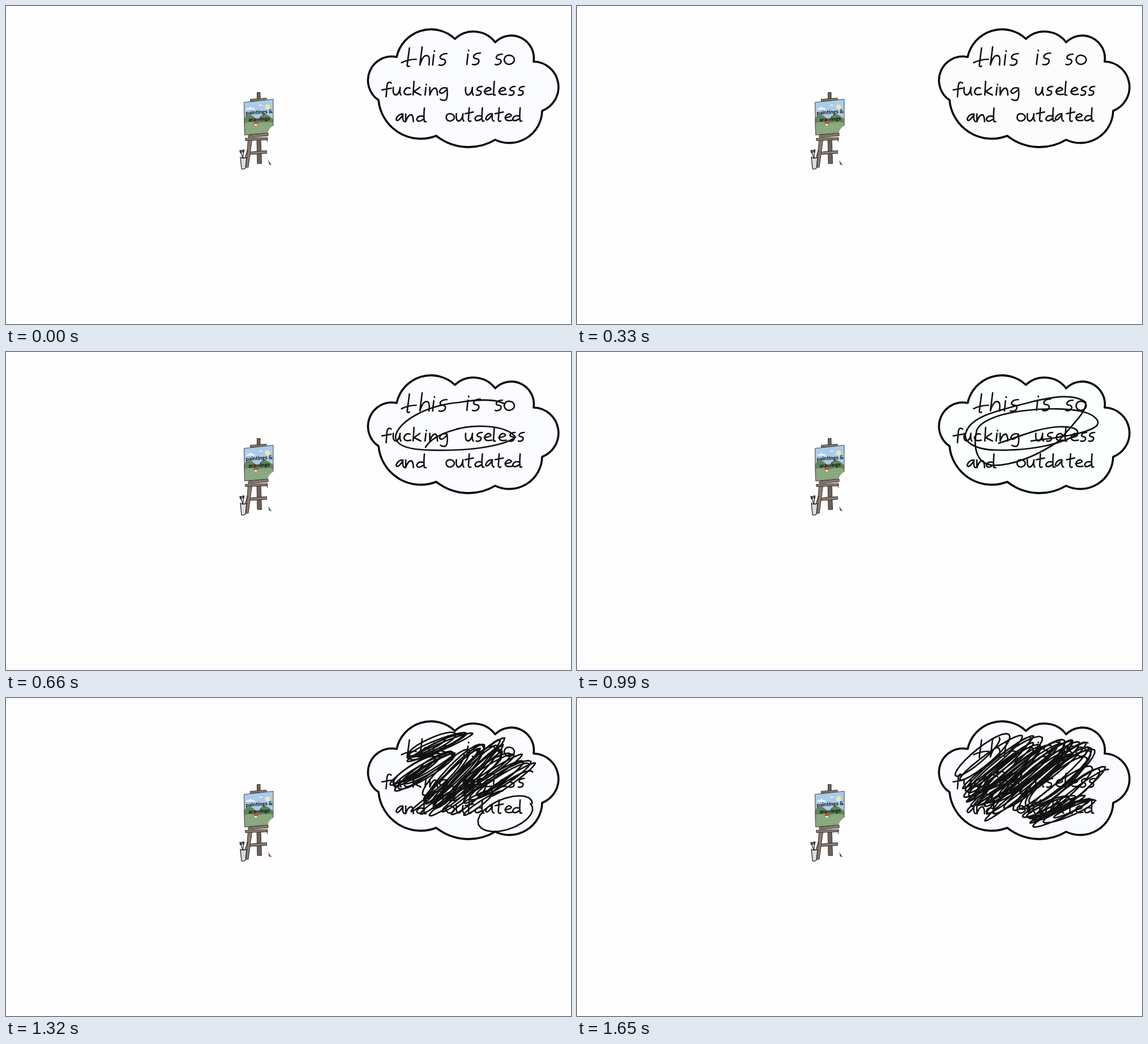
An HTML page for the animation above (1980 ms loop, 998 by 561 pixels).

```html
<!DOCTYPE html>
<html lang="en">
<head>
<meta charset="utf-8">
<title>Thought bubble</title>
<style>
  html, body { margin: 0; width: 100%; height: 100%; overflow: hidden; background: #fefefe; }
  svg { display: block; width: 100%; height: 100%; }
  .pen { fill: none; stroke: #111; stroke-linecap: round; stroke-linejoin: round; }
  .pen path { vector-effect: non-scaling-stroke; }
  .label { font: bold 9.5px Lato, "Open Sans", sans-serif; fill: #0b0b0b; }
</style>
</head>
<body>
<svg viewBox="0 0 998 561">
  <defs>
    <clipPath id="canvasEdge"><path d="M420 170L472 164V211Q464 216 462 224L421 228Z"/></clipPath>
  </defs>

  <g stroke="#3a322d" fill="#8a7a6e">
    <path fill="#6d6057" d="M443.5 152.5H449V164H443.5ZM443 235H450L451.5 278H444Z"/>
    <path d="M431.5 164.5L460 162.5V166L431.5 168Z"/>
    <path d="M430 257.5L460.5 255V260L429.5 262Z"/>
    <path d="M427.5 236H434.5L428 284.5H423.5Z"/>
    <path d="M428 228L463 224V229L428 232ZM422.5 233.5L462 232V236L423 237.5Z"/>
    <path fill="none" d="M460.5 234L462 240"/>
    <path fill="#3a322d" stroke="none" d="M463.5 271L465.5 276L469.5 281L464.5 279Z"/>
  </g>

  <g clip-path="url(#canvasEdge)">
    <path fill="#abcbea" d="M418 160H474V230H418Z"/>
    <path fill="#e9f2fb" d="M424 183Q425 179 429 180Q432 175 435 180Q439 179 440 183ZM446 176Q450 171 454 176Z"/>
    <circle cx="462" cy="178" r="4.5" fill="#f1e5ab"/>
    <path fill="#638459" d="M418 202Q425 189 433 192Q440 196 445 203Q451 188 459 191Q467 194 474 202V212H418Z"/>
    <path fill="#8aa87d" d="M418 208Q430 202 444 207Q459 203 474 206V230H418Z"/>
    <path fill="none" stroke="#b4cbaa" stroke-dasharray="1 4" d="M423 215L463 212M425 221L462 218"/>
    <path fill="#f7eee5" d="M439.5 207H443V211H439.5Z"/>
    <path fill="#e5392d" d="M437.5 208Q438 204 441.5 204Q445 204 445 208Z"/>
  </g>
  <path fill="none" stroke="#454840" d="M472 211V164.5L420.5 170L421.5 227.5L462 224"/>
  <g class="label">
    <text transform="translate(423.5 192) rotate(-4)">paintings &amp;</text>
    <text transform="translate(428.5 204) rotate(-4)">arawings</text>
  </g>
  <g stroke="#222" fill="none" stroke-width="1.3">
    <path d="M415 258L418 268M419 256V268M427 254L422 268"/>
    <path fill="#777" d="M413 255H416V258L414 259ZM418 254H420.5L420 258L418 257Z"/>
    <path fill="#d9dde0" d="M414 267Q419 270 425 267L423 286Q419 289 416 287Z"/>
  </g>

  <path id="cloud" stroke="#080808" stroke-width="3.6" stroke-linejoin="round" d="M690 90
    A62 62 0 0 1 793 58A48 48 0 0 1 864 64A40 40 0 0 1 932 98A45 45 0 0 1 947 185
    A58 58 0 0 1 864 236A92 92 0 0 1 760 229A75 75 0 0 1 658 166A42 42 0 0 1 690 90Z"/>
  <g id="words" class="pen" stroke-width="2.6"></g>
  <path id="scribble" class="pen" stroke-width="2.7"/>
</svg>

<script>
const STEP = 330;
const byId = id => document.getElementById(id);

// Pen strokes on a baseline at 0; the key's number is the letter's width
const glyphs = {
  T: { width: 11, d: 'M6-15L4 0Q4 2 6 1M-1-2Q5-5 12-5' },
  t: { width: 9, d: 'M5-16L4-2Q4 1 7 0M0-9L10-11' },
  h: { width: 9, d: 'M2-16L0 0Q3-10 7-8Q9-7 8 0' },
  i: { width: 2, d: 'M1-9L0 0M1.5-12.5l.2.5' },
  s: { width: 7, d: 'M7-10Q2-10 1-7Q1-5 4-5Q7-4 5-1Q3 1 0 0' },
  o: { width: 10, d: 'M5-9Q0-9 0-4Q1 0 5 0Q10-1 10-5Q9-9 4-9' },
  f: { width: 10, d: 'M11-14Q7-17 6-11L5 2M0-6L11-8' },
  u: { width: 9, d: 'M0-9Q-1 0 3 0Q7-1 8-9Q7-2 9 0' },
  c: { width: 8, d: 'M7-8Q2-10 0-4Q0 1 8-1' },
  k: { width: 9, d: 'M1-16L0 0M8-9L1-4L9 0' },
  n: { width: 9, d: 'M0-9L0 0Q3-9 7-8Q9-6 9 0' },
  g: { width: 10, d: 'M9-8Q2-10 0-4Q2 1 9-7Q10 4 7 6Q4 7 1 5' },
  e: { width: 9, d: 'M0-4Q8-5 8-7Q5-11 1-6Q-1 1 9-1' },
  l: { width: 3, d: 'M1-16Q0-5 0 0l2 0' },
  a: { width: 10, d: 'M8-9Q2-9 0-3Q1 2 8-8Q7-1 10 0' },
  d: { width: 11, d: 'M8-6Q2-8 0-3Q1 2 8-3M9-16Q8-5 9 0L11 0' }
};

const words = [
  { text: 'This', x: 702, y: 104, size: 2, gap: 6.5 },
  { text: 'is', x: 813, y: 103, size: 2, gap: 6 },
  { text: 'so', x: 865, y: 103, size: 1.8, gap: 3 },
  { text: 'fucking', x: 664, y: 157, size: 1.5, gap: 5.3 },
  { text: 'useless', x: 812, y: 157, size: 1.5, gap: 4.3 },
  { text: 'and', x: 688, y: 204, size: 1.5, gap: 4 },
  { text: 'outdated', x: 777, y: 203, size: 1.45, gap: 3.1 }
];

function seeded(seed) {
  return () => (seed = seed * 16807 % 2147483647) / 2147483647;
}

// Each take wobbles the letters a little differently
function lettering(take) {
  const random = seeded(take);
  return words.map(({ text, x, y, size, gap }) => [...text].map(letter => {
    const { width, d } = glyphs[letter];
    const at = x + (random() - .5) * 3;
    x += width * size + gap;
    return `<path d="${d}" transform="translate(${at} ${y}) scale(${size})"/>`;
  }).join('')).join('');
}

const mix = (a, b, t) => a + (b - a) * t;

// Tilted loops whose centre drifts, longest halfway along
function swirl({ from, to, turns, reach, tilt, girth = .2 }, seed) {
  const random = seeded((seed + 1) * 7919);
  const wild = Array.from({ length: turns + 2 }, () => [random(), random(), random()]);
  const angle = tilt * Math.PI / 180, cos = Math.cos(angle), sin = Math.sin(angle);
  const points = [];
  for (let n = 0; n <= turns * 24; n++) {
    const t = n / 24, k = Math.floor(t), p = t / turns;
    const [length, shift, width] = wild[k].map((v, j) => mix(v, wild[k + 1][j], t - k));
    const size = reach * (.72 + .28 * Math.sin(p * Math.PI));
    const along = size * (mix(.75, 1, length) * Math.cos(t * 2 * Math.PI) + (shift - .5) * .35);
    const across = size * (girth * mix(.3, 1, width) * Math.sin(t * 2 * Math.PI) + (length - .5) * .25);
    const x = mix(from[0], to[0], p) + along * cos - across * sin;
    const y = mix(from[1], to[1], p) + along * sin + across * cos;
    points.push(x.toFixed(1) + ' ' + y.toFixed(1));
  }
  return 'M' + points.join('L');
}

const tangle = swirls => swirls.map(swirl).join('');

const firstLoop = `M881 92C865 82 830 84 800 89C740 94 690 125 688 150
  C690 175 745 174 790 173S885 163 900 150C880 126 820 128 790 138C762 146 748 156 741 168`;
const secondLoop = `M745 161C785 148 815 134 850 132C880 131 895 139 875 150C840 167 790 174 740 173
  C700 172 681 157 687 142C696 113 745 103 795 90S878 74 898 88
  C903 103 875 128 850 158C824 175 780 200 735 200C703 197 700 165 706 138
  C722 101 850 94 892 105C917 111 928 125 914 133C895 145 850 151 802 157`;

const heavy = tangle([
  { from: [742, 92], to: [765, 84], turns: 5, reach: 66, tilt: -24 },
  { from: [710, 138], to: [755, 122], turns: 7, reach: 66, tilt: -32 },
  { from: [768, 145], to: [842, 128], turns: 12, reach: 90, tilt: -45 },
  { from: [840, 130], to: [896, 152], turns: 9, reach: 72, tilt: -33 },
  { from: [735, 182], to: [850, 185], turns: 6, reach: 54, tilt: -35 },
  { from: [880, 207], to: [884, 207], turns: 1, reach: 72, tilt: -22, girth: .5 }
]);
const heavier = tangle([
  { from: [706, 112], to: [888, 165], turns: 22, reach: 98, tilt: -39 },
  { from: [745, 140], to: [850, 118], turns: 10, reach: 92, tilt: -39 },
  { from: [705, 160], to: [760, 168], turns: 5, reach: 58, tilt: -34 },
  { from: [815, 198], to: [886, 198], turns: 7, reach: 62, tilt: -24 }
]);

const scenes = [
  { fill: '#fafcff', marks: '' },
  { fill: '#fcfcfc', marks: '' },
  { fill: '#fafcff', marks: firstLoop },
  { fill: '#fbfffd', marks: secondLoop },
  { fill: '#fafcff', marks: heavy },
  { fill: '#fafbff', marks: heavier }
];
const takes = [lettering(5000), lettering(90000)];
let shown = -1;

function draw(time) {
  const index = Math.floor(time / STEP) % scenes.length;
  if (index === shown) return;
  shown = index;
  const { fill, marks } = scenes[index];
  byId('cloud').setAttribute('fill', fill);
  byId('scribble').setAttribute('d', marks);
  byId('words').innerHTML = takes[index % 2];
}

const start = performance.now();
function tick() {
  draw(performance.now() - start);
  requestAnimationFrame(tick);
}
tick();
</script>
</body>
</html>
```
